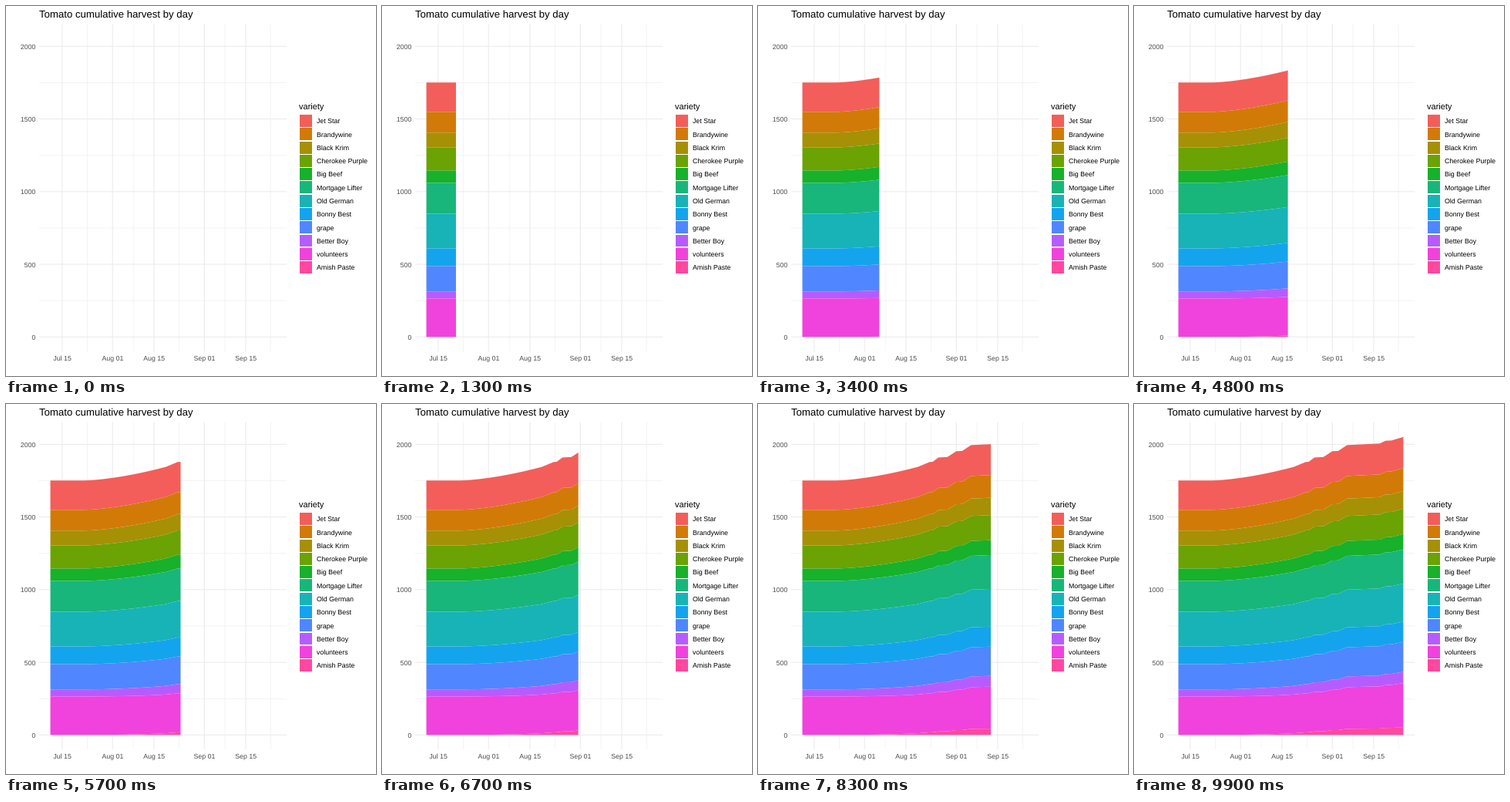
Animation, 480 px wide and 480 px high, one loop 10000 ms. Source, as a matplotlib script:

```python
import numpy as np
import matplotlib.pyplot as plt
from matplotlib.animation import FuncAnimation
from matplotlib.patches import PathPatch, Polygon, Rectangle
from matplotlib.textpath import TextPath
from matplotlib.transforms import Affine2D

SIZE, DPI = 480, 100
FRAMES, STEP = 100, 100
PT = 72 / DPI  # one pixel in points
LAST_DAY = 76
LEFT, RIGHT, TOP, BOTTOM = 42.8, 364.1, 23.6, 448.3
GREY = "#4D4D4D"

plt.rcParams["font.family"] = "Liberation Sans"

# variety, colour, weight on the first day, gain over the season
VARIETIES = [
    ("Jet Star", "#F35E5A", 202, 12),
    ("Brandywine", "#D27A07", 143, 15),
    ("Black Krim", "#A69006", 102, 20),
    ("Cherokee Purple", "#6BA204", 159, 15),
    ("Big Beef", "#17B12B", 85, 20),
    ("Mortgage Lifter", "#18B67A", 212, 24),
    ("Old German", "#17B3B7", 239, 23),
    ("Bonny Best", "#14A4ED", 122, 18),
    ("grape", "#5086FF", 174, 31),
    ("Better Boy", "#B65CFF", 48, 30),
    ("volunteers", "#F042DD", 265, 38),
    ("Amish Paste", "#FF489F", 0, 54),
]
LATE = {"volunteers": 3, "Amish Paste": 1.5}  # easing power of late croppers
NO_HARVEST = {42, 51, 58, 59, 60, 64, 67}
# big pickings: first day, last day, weight
PICKINGS = [(39, 43, 30), (44, 46, 28), (49, 52, 37),
            (54, 57, 37), (68, 70, 17), (72, 76, 20)]


def px(day):
    return 57.55 + 3.84 * np.asarray(day)


def py(weight):
    return 429.3 - 0.1885 * np.asarray(weight)


def growth(day):
    """Weight gained: slow start, steady trickle, then bursts of picking."""
    gain = 0.452 * (np.clip(day, 11, 39) - 11) ** 1.6
    gain = gain + np.maximum(day - 39, 0)
    for first, last, weight in PICKINGS:
        gain = gain + weight * np.clip((day - first) / (last - first), 0, 1)
    return gain


def stack_levels(day):
    """Band edges from the top of the stack down to zero."""
    gained = growth(day)
    p = np.maximum(gained / growth(LAST_DAY), 1e-6)
    rise = np.array([g * p ** LATE.get(name, 1) for name, _, _, g in VARIETIES])
    start = np.array([v[2] for v in VARIETIES])[:, None]
    weights = start + rise / rise.sum(axis=0) * gained
    tops = np.cumsum(weights[::-1], axis=0)[::-1]
    return np.vstack([tops, np.zeros(len(day))])


days = np.array([d for d in range(LAST_DAY + 1) if d not in NO_HARVEST])
day_frame = np.round(days * (FRAMES - 1) / LAST_DAY)
levels = stack_levels(days)

fig = plt.figure(figsize=(SIZE / DPI, SIZE / DPI), dpi=DPI, facecolor="white")
ax = fig.add_axes([0, 0, 1, 1])
ax.set(xlim=(0, SIZE), ylim=(SIZE, 0))
ax.axis("off")


def grid(xs, ys, width):
    style = dict(color="#EBEBEB", lw=width * PT, snap=False,
                 solid_capstyle="butt", zorder=1)
    for x in xs:
        ax.plot([x, x], [TOP, BOTTOM], **style)
    for y in ys:
        ax.plot([LEFT, RIGHT], [y, y], **style)


def label(x, y, text, size=8.8, color="black", align=0.0):
    """Text on a whole-pixel baseline; align 0 is left, 1 is right."""
    path = TextPath((0, 0), text, size=size)
    x = x - align * path.get_extents().x1
    place = Affine2D().scale(1, -1).translate(x, round(float(y)))
    ax.add_patch(PathPatch(path, fc=color, lw=0, snap=False,
                           transform=place + ax.transData))


ticks = {"Jul 15": 4, "Aug 01": 21, "Aug 15": 35, "Sep 01": 52, "Sep 15": 66}
majors = np.arange(0, 2001, 500)
grid(px(np.arange(12.5, LAST_DAY, 15.5)), py(majors[:-1] + 250), 0.53)
grid(px(list(ticks.values())), py(majors), 1.07)

for name, day in ticks.items():
    label(px(day), 460, name, color=GREY, align=0.5)
for weight in majors:
    label(38, py(weight) + 3.5, str(weight), color=GREY, align=1)

label(43, 15, "Tomato cumulative harvest by day", 13.2)
label(380, 134, "variety", 11)

bands = []
for i, (name, color, *_) in enumerate(VARIETIES):
    mid = 149 + 17.28 * i
    ax.add_patch(Rectangle((381, mid - 7.95), 16, 15.9, fc=color, lw=0,
                           snap=True))
    label(403, mid + 3.3, name)
    band = Polygon([(0, 0)] * 3, fc=color, lw=0, snap=False, zorder=2)
    bands.append(ax.add_patch(band))


def update(k):
    head = np.interp(k, day_frame, days)
    shown = np.append(days[days < head], head)
    x = px(shown)
    edges = [py(np.interp(shown, days, level)) for level in levels]
    for band, upper, lower in zip(bands, edges, edges[1:]):
        band.set_visible(k > 0)
        band.set_xy(np.column_stack([np.append(x, x[::-1]),
                                     np.append(upper, lower[::-1])]))
    return bands


anim = FuncAnimation(fig, update, frames=FRAMES, interval=STEP, repeat=True,
                     repeat_delay=0, blit=False)
plt.show()
```
